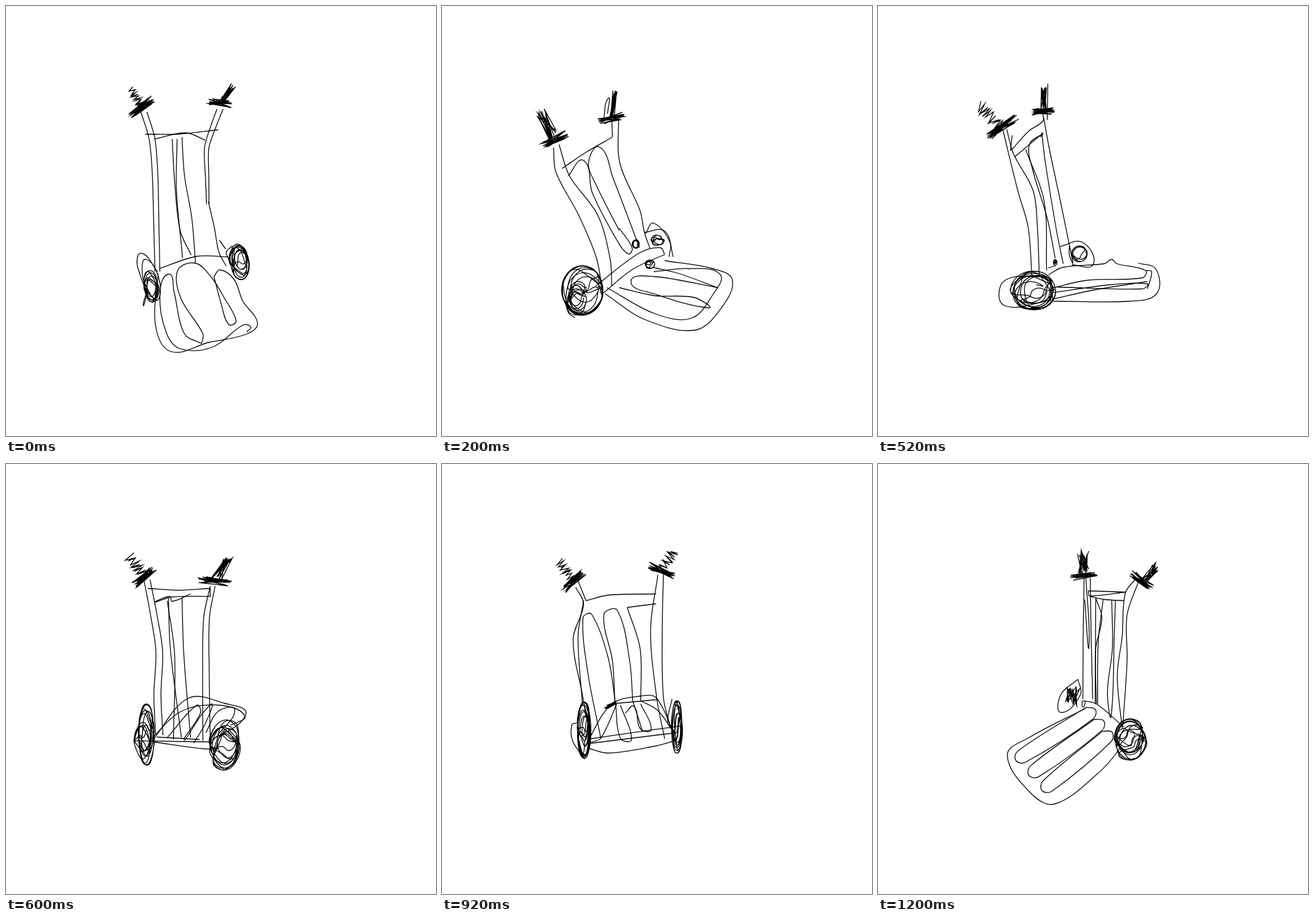
An HTML page with a canvas that plays this animation: 700 px wide and 700 px high, repeating every 1.4 s.

```html
<!DOCTYPE html>
<html>
<head>
<meta charset="utf-8">
<title>Turning hand truck</title>
<style>
html, body { margin: 0; height: 100%; overflow: hidden; background: #fff; }
canvas { display: block; width: 100vw; height: 100vh; }
</style>
</head>
<body>
<canvas id="stage" width="700" height="700"></canvas>
<script>
const ctx = document.getElementById('stage').getContext('2d');
const HOLD = 200;
let seed = 1;

function rnd() {
  seed = (seed * 16807) % 2147483647;
  return seed / 2147483647;
}
const jitter = a => (rnd() * 2 - 1) * a;

// Round curve through all points: tangents follow the neighbours, scaled to each chord
function curve(p) {
  const dir = i => {
    const a = p[Math.max(i - 1, 0)], b = p[Math.min(i + 1, p.length - 1)];
    const x = b[0] - a[0], y = b[1] - a[1], n = Math.hypot(x, y) || 1;
    return [x / n, y / n];
  };
  ctx.beginPath();
  ctx.moveTo(...p[0]);
  for (let i = 0; i < p.length - 1; i++) {
    const [x, y] = p[i], [u, v] = p[i + 1], [a, b] = dir(i), [c, d] = dir(i + 1);
    const h = Math.hypot(u - x, v - y) / 3;
    ctx.bezierCurveTo(x + a * h, y + b * h, u - c * h, v - d * h, u, v);
  }
  ctx.stroke();
}

function pairs(xy) {
  const p = [];
  for (let i = 0; i < xy.length; i += 2) p.push([xy[i], xy[i + 1]]);
  return p;
}
const line = (...xy) => curve(pairs(xy));

// Two edges around an upright centre line, half width from a to b
function rail(a, b, ...xy) {
  const p = pairs(xy);
  for (const side of [-1, 1])
    curve(p.map(([x, y], i) => [x + side * (a + (b - a) * i / (p.length - 1)), y]));
}

// Closed bar with round ends
function slot(x, y, u, v, w) {
  const n = Math.hypot(u - x, v - y), a = (u - x) / n * w, b = (v - y) / n * w;
  line(x - b, y + a, u - b, v + a, u + a, v + b, u + b, v - a,
    x + b, y - a, x - a, y - b, x - b, y + a);
}

// Overlapping hand-drawn loops
function wheel(x, y, rx, ry, tilt = 0, turns = 4) {
  const p = [], c = Math.cos(tilt), s = Math.sin(tilt);
  let r, ox, oy;
  for (let i = 0; i <= turns * 8; i++) {
    if (i % 4 == 0) {
      r = 1 - 0.65 * rnd() ** 1.4;
      ox = jitter(1 - r);
      oy = jitter(1 - r);
    }
    const a = i * Math.PI / 4, px = rx * (r * Math.cos(a) + ox), py = ry * (r * Math.sin(a) + oy);
    p.push([x + px * c - py * s, y + px * s + py * c]);
  }
  curve(p);
}

// Fills a bar of half width w with strokes along or across it
function scribble(x, y, u, v, w, across, n = 20) {
  const len = Math.hypot(u - x, v - y), nx = (y - v) / len, ny = (u - x) / len;
  ctx.beginPath();
  for (let i = 0; i <= n; i++) {
    const odd = i % 2, t = across ? i / n + jitter(0.08) : odd * 0.75 + rnd() * 0.25;
    const s = across ? (odd ? w : -w) * (0.6 + 0.5 * rnd()) : jitter(w);
    ctx.lineTo(x + (u - x) * t + nx * s, y + (v - y) * t + ny * s);
  }
  ctx.stroke();
}

// Handle from its tip to the hand guard, which is a flat tilted scribble
function grip(x, y, u, v, w, len, tilt, across) {
  scribble(x, y, u, v, w, across);
  const a = len * Math.cos(tilt), b = len * Math.sin(tilt);
  scribble(u - a, v - b, u + a, v + b, 6, false, 24);
}

const poses = [
  () => {
    grip(203, 136, 221, 165, 6, 24, -0.68, true);
    grip(370, 127, 348, 157, 5, 21, 0.15);
    rail(5, 4, 224, 172, 237, 215, 242, 270, 244, 345, 246, 432);
    rail(5, 2, 348, 167, 333, 207, 326, 232, 327, 280, 328, 322);
    line(329, 318, 339, 362, 346, 400, 358, 423);
    line(347, 381, 357, 395);
    line(226, 208, 280, 208, 345, 201);
    line(241, 216, 292, 206, 324, 218);
    line(270, 216, 274, 285, 283, 365, 301, 405);
    line(278, 216, 277, 300, 287, 410);
    line(286, 213, 290, 275, 302, 345, 308, 418);
    line(249, 427, 310, 407, 361, 408);
    line(247, 435, 243, 520, 268, 562, 330, 547, 390, 534, 409, 516, 385, 480, 371, 445, 348, 429, 338, 440);
    line(338, 440, 350, 485, 362, 518, 374, 512, 355, 475, 333, 440, 307, 418, 279, 430, 284, 475, 320, 533, 318, 549);
    line(318, 549, 290, 533, 273, 465, 264, 436, 250, 470, 260, 530, 282, 557, 335, 555, 385, 519, 398, 522, 391, 530);
    line(246, 432, 220, 402, 214, 425, 243, 478, 250, 450, 228, 412, 222, 440, 235, 470);
    line(230, 462, 223, 486, 230, 465);
    wheel(236, 456, 12, 26, -0.1, 7);
    wheel(379, 416, 16, 30, -0.15, 9);
    line(368, 390, 358, 402, 376, 432);
  },
  () => {
    grip(158, 170, 183, 217, 9, 24, -0.45);
    grip(281, 137, 276, 183, 4, 23, -0.25);
    line(263, 182, 270, 150, 269, 175);
    line(181, 230, 185, 270, 222, 340, 251, 410, 261, 468);
    line(190, 225, 207, 276, 253, 340, 273, 410, 276, 455);
    line(195, 264, 235, 237, 277, 213);
    line(277, 213, 276, 184);
    line(287, 180, 289, 255, 322, 333, 329, 368, 338, 394);
    line(205, 276, 230, 251, 244, 303, 285, 382, 303, 403, 309, 393, 288, 361);
    line(288, 365, 250, 290, 238, 255, 256, 229, 278, 280, 321, 393);
    line(250, 455, 320, 402, 355, 393, 362, 404);
    line(262, 467, 310, 428, 362, 404);
    wheel(228, 463, 34, 41, 0, 10);
    wheel(220, 470, 17, 25, 0, 4);
    line(200, 480, 206, 500, 216, 507);
    line(329, 368, 362, 366, 376, 408);
    line(331, 370, 344, 353, 371, 385, 369, 408);
    wheel(350, 380, 11, 9);
    wheel(315, 387, 6, 7);
    wheel(338, 420, 8, 7);
    line(265, 468, 330, 510, 412, 527, 455, 490, 472, 445, 440, 427, 362, 414);
    line(268, 458, 345, 500, 405, 508, 440, 470, 452, 436, 400, 427, 344, 432);
    line(288, 458, 345, 471, 410, 474, 434, 491, 345, 468, 307, 448, 345, 440, 448, 458);
    line(448, 458, 385, 435, 343, 425);
  },
  () => {
    grip(164, 163, 202, 197, 9, 31, -0.62, true);
    grip(270, 130, 269, 171, 5, 20, -0.05);
    line(276, 126, 275, 185);
    line(203, 202, 227, 300, 244, 360, 250, 438);
    line(209, 200, 220, 240, 252, 300, 259, 360, 262, 436);
    line(218, 210, 215, 235);
    line(216, 235, 245, 203, 268, 187, 268, 175);
    line(222, 245, 268, 207, 264, 213);
    line(269, 180, 278, 230, 297, 320, 317, 418);
    line(266, 205, 272, 255, 290, 365, 301, 419);
    line(268, 207, 246, 225, 251, 265, 275, 345, 288, 410);
    line(240, 233, 270, 318, 274, 430);
    line(276, 426, 289, 422);
    wheel(288, 417, 3, 5);
    wheel(327, 403, 13, 13);
    line(296, 391, 332, 384, 350, 420, 315, 421);
    line(311, 390, 311, 405, 317, 420);
    line(272, 440, 205, 447, 205, 487, 282, 478);
    wheel(252, 463, 37, 32, 0, 11);
    line(277, 437, 300, 425, 368, 419, 380, 412, 388, 419, 435, 430, 430, 442, 340, 446, 285, 458);
    line(423, 418, 452, 428, 453, 468, 410, 480, 285, 480);
    line(436, 430, 445, 432, 438, 460);
    line(287, 476, 350, 462, 438, 448);
    line(285, 466, 380, 453, 438, 452, 430, 460, 290, 457);
  },
  () => {
    grip(202, 151, 224, 183, 9, 23, -0.73, true);
    grip(361, 148, 339, 190, 9, 28, 0.12);
    rail(5, 6, 229, 188, 240, 245, 249, 305, 246, 375, 249, 441);
    rail(4, 6, 336, 198, 326, 250, 325, 340, 326, 450);
    line(230, 202, 280, 205, 332, 202);
    line(332, 202, 332, 216);
    line(241, 225, 270, 216, 332, 215);
    line(241, 224, 266, 215, 270, 223, 300, 211);
    line(264, 218, 267, 300, 285, 445);
    line(262, 222, 274, 310, 272, 448);
    line(286, 218, 289, 310, 300, 445);
    line(240, 447, 296, 381, 355, 389, 390, 407, 333, 450);
    line(233, 450, 285, 402, 345, 392, 388, 409, 365, 425);
    line(262, 445, 310, 392, 316, 405, 288, 448);
    line(290, 450, 333, 391, 325, 420, 305, 454);
    line(325, 437, 345, 402, 372, 400, 345, 440);
    line(207, 450, 335, 452);
    line(245, 444, 315, 448);
    line(240, 452, 320, 463, 345, 463);
    wheel(228, 440, 13, 50, 0, 8);
    wheel(221, 447, 13, 33, 0.1, 3);
    wheel(356, 457, 25, 41, 0.05, 11);
  },
  () => {
    grip(191, 159, 214, 190, 7, 23, -0.7, true);
    grip(379, 142, 355, 173, 8, 26, 0.4, true);
    line(217, 200, 230, 228, 213, 285, 229, 380, 234, 410);
    line(221, 190, 234, 222);
    line(234, 222, 270, 213, 348, 211);
    line(230, 222, 221, 280, 228, 390);
    line(351, 180, 339, 270, 349, 380, 362, 447);
    line(360, 178, 358, 270, 360, 380, 372, 430);
    line(258, 446, 237, 340, 229, 250, 243, 244, 270, 315, 282, 390);
    line(281, 390, 277, 320, 263, 245, 285, 238, 305, 320, 310, 385);
    line(348, 227, 301, 233);
    line(301, 233, 322, 300, 323, 385);
    line(282, 390, 290, 446, 308, 448, 290, 392);
    line(298, 405, 312, 394, 322, 430, 340, 432, 323, 390);
    line(310, 385, 326, 435);
    line(232, 460, 275, 391, 325, 377, 348, 380, 378, 440);
    line(275, 390, 350, 383);
    line(323, 385, 350, 400, 375, 433);
    line(240, 453, 258, 446, 284, 390);
    scribble(264, 397, 283, 388, 3);
    line(240, 447, 330, 434, 388, 426);
    line(235, 455, 380, 437);
    line(237, 462, 270, 470, 345, 459, 382, 449);
    wheel(231, 433, 11, 46, 0, 12);
    wheel(382, 428, 9, 43, 0, 9);
    line(219, 421, 211, 424, 212, 450, 232, 480);
    line(374, 382, 367, 420, 378, 437);
  },
  () => {
    grip(194, 166, 213, 212, 6, 21, -0.25);
    grip(368, 137, 344, 167, 7, 16, 0.7);
    line(217, 217, 227, 330, 242, 420, 250, 470);
    line(221, 216, 228, 218, 232, 252, 249, 298, 251, 355, 261, 464);
    line(233, 255, 285, 225, 325, 196, 340, 210);
    line(334, 213, 285, 241, 246, 266, 263, 310, 302, 425);
    line(292, 232, 271, 255, 293, 340, 308, 420);
    line(292, 232, 302, 285, 320, 405);
    line(320, 405, 336, 409, 318, 320, 297, 260, 300, 235, 332, 213);
    line(338, 182, 334, 215, 343, 370, 348, 405);
    line(348, 175, 340, 210, 356, 305, 356, 375);
    line(248, 455, 170, 420, 172, 394, 262, 377, 357, 404, 285, 447, 250, 470);
    line(250, 450, 178, 420, 190, 400, 235, 380);
    line(210, 399, 255, 435, 273, 440, 235, 402, 212, 398);
    line(248, 379, 290, 427, 310, 425, 280, 395, 248, 380);
    line(250, 465, 300, 450, 358, 403);
    line(248, 478, 350, 412);
    line(245, 455, 285, 425, 345, 418);
    wheel(229, 470, 22, 44, 0, 10);
    wheel(366, 408, 10, 38, -0.08, 11);
  },
  () => {
    grip(333, 139, 334, 181, 10, 23, -0.18);
    grip(456, 164, 428, 189, 8, 23, 0.65);
    rail(5, 8, 340, 185, 340, 280, 341, 382);
    line(338, 185, 343, 295, 336, 220);
    line(342, 206, 402, 208);
    line(402, 208, 344, 214, 342, 206);
    line(345, 215, 368, 220, 400, 222);
    line(354, 218, 364, 250, 354, 300, 355, 390);
    line(354, 218, 353, 390);
    line(366, 220, 358, 290, 357, 390);
    line(380, 222, 381, 300, 373, 370, 379, 410, 384, 280, 386, 222);
    line(420, 185, 402, 210, 397, 280, 389, 345, 397, 430);
    line(424, 190, 405, 245, 405, 320, 398, 425);
    line(325, 350, 297, 375, 298, 404, 329, 375, 325, 350);
    scribble(319, 361, 313, 391, 11);
    line(332, 385, 333, 395, 337, 387);
    line(333, 385, 355, 390, 400, 428);
    line(338, 397, 245, 445, 210, 474, 250, 537, 287, 553, 352, 508, 393, 462, 388, 450);
    for (let i = 0; i < 3; i++) slot(344 + 14 * i, 405 + 19 * i, 233 + 21 * i, 476 + 24 * i, 11);
    wheel(410, 448, 26, 34, 0, 11);
  }
];

let shown = -1;
function tick() {
  const i = Math.floor(performance.now() / HOLD) % poses.length;
  if (i != shown) {
    shown = i;
    seed = 977 + i * 5003;
    ctx.setTransform(1, 0, 0, 1, 0, 0);
    ctx.clearRect(0, 0, 700, 700);
    ctx.translate(0.5, 0.5);
    ctx.lineWidth = 1.3;
    poses[i]();
  }
  requestAnimationFrame(tick);
}
tick();
</script>
</body>
</html>
```
